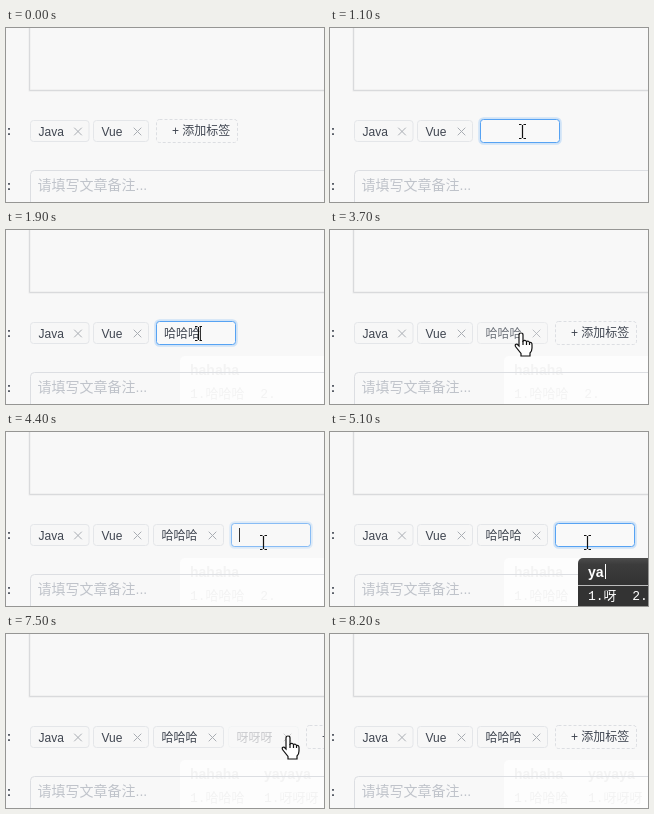
These frames come from a looping animation (318 px wide and 174 px high, 8.6 s). An HTML page with a canvas:

```html
<!DOCTYPE html>
<html lang="zh">
<head>
<meta charset="utf-8">
<style>
  html, body { margin: 0; width: 100%; height: 100%; overflow: hidden; background: #f8f8f8; }
  canvas { display: block; width: 318px; height: 174px; }
</style>
</head>
<body>
<canvas id="stage"></canvas>
<script>
const W = 318, H = 174, LOOP = 8600, STEP = 100;
const SANS = '"Liberation Sans", "Noto Sans CJK SC", "Noto Sans CJK", sans-serif';
const MONO = '"Liberation Mono", "Noto Sans CJK SC", "Noto Sans CJK", monospace';
const INK = '#3f4550', LINE = '#dcdee2', BLUE = '#57a3f3';

const canvas = document.getElementById('stage');
const ctx = canvas.getContext('2d');
const ratio = window.devicePixelRatio || 1;
canvas.width = W * ratio;
canvas.height = H * ratio;

// Each editing session: open the field, type pinyin, commit, confirm with Enter.
const sessions = [
  { x: 150, open: 600, type: 1500, commit: 1900, enter: 3200, pinyin: 'ha', word: '哈' },
  { x: 225, open: 4300, type: 5100, commit: 5500, enter: 6300, pinyin: 'ya', word: '呀' }
];
const REMOVE = 7400, REMOVED = 7600;

// Pointer path: time, x, y
const pointerPath = [
  [100, 254, 88], [200, 226, 97], [300, 205, 102], [400, 192, 103.5],
  [3600, 192, 103.5], [3700, 191, 103], [3800, 212, 106], [3900, 242, 109], [4000, 257, 110.5],
  [6200, 257, 110.5], [6300, 255.5, 110], [6800, 255.5, 110], [6900, 265, 107], [7000, 276, 103], [7100, 282, 102],
  [7600, 282, 102], [7700, 280, 108], [7800, 275, 120], [7900, 268, 140], [8000, 260, 158], [8100, 253, 176]
];

const HAND = new Path2D('M-2 13V2Q-2 0 0 0T2 2V8Q4 6.5 5.5 8.5Q7.5 7.5 8.5 9.5Q11 9 11 11.5V15Q11 18 9 20V23H0V20.5L-5.5 13.5Q-6.5 11 -4 11Z');
const FINGERS = new Path2D('M2 8V12M5.5 9V12M8.5 10V12');
const ARROW = new Path2D('M0 0V16L4 12.5L6.5 18.5L9 17.5L6.5 11.5H11.5Z');
const IBEAM = new Path2D('M-3.5 -7H-1M1 -7H3.5M0 -6.5V6.5M-3.5 7H-1M1 7H3.5');

const clamp = v => Math.max(0, Math.min(1, v));

function text(str, x, y, color = INK, font = '12px ' + SANS) {
  ctx.font = font;
  ctx.fillStyle = color;
  ctx.fillText(str, x, y);
}

function box(x, y, w, h, radius, stroke, fill, lineWidth = 1) {
  ctx.beginPath();
  ctx.roundRect(x, y, w, h, radius);
  if (fill) { ctx.fillStyle = fill; ctx.fill(); }
  if (stroke) { ctx.strokeStyle = stroke; ctx.lineWidth = lineWidth; ctx.stroke(); }
}

function withAlpha(alpha, draw) {
  ctx.save();
  ctx.globalAlpha = alpha;
  draw();
  ctx.restore();
}

function pointerAt(t) {
  const i = pointerPath.findIndex(p => p[0] >= t);
  if (i < 0 || t < pointerPath[0][0]) return null;
  const b = pointerPath[i], a = pointerPath[Math.max(0, i - 1)];
  const k = b[0] === a[0] ? 1 : (t - a[0]) / (b[0] - a[0]);
  return { x: a[1] + (b[1] - a[1]) * k, y: a[2] + (b[2] - a[2]) * k };
}

const inside = (p, x, y, w, h) => p && p.x >= x && p.x <= x + w && p.y >= y && p.y <= y + h;

function drawTag(label, x, w, alpha = 1, closeHover = false) {
  withAlpha(alpha, () => {
    box(x + .5, 92.5, w - 1, 21, 3, '#e4e6e9', '#f7f7f7');
    text(label, x + 8.5, 107.5);
    const cx = x + w - 11.5, r = 3.8;
    ctx.strokeStyle = closeHover ? '#555' : '#a9adb3';
    ctx.lineWidth = 1;
    ctx.beginPath();
    ctx.moveTo(cx - r, 103.5 - r); ctx.lineTo(cx + r, 103.5 + r);
    ctx.moveTo(cx + r, 103.5 - r); ctx.lineTo(cx - r, 103.5 + r);
    ctx.stroke();
  });
}

function drawButton(x, hover) {
  ctx.setLineDash([3, 2]);
  box(x + .5, 91.5, 81, 23, 3, hover ? BLUE : LINE);
  ctx.setLineDash([]);
  text('+ 添加标签', x + 16, 107, hover ? BLUE : INK);
}

function drawInput(s, t) {
  withAlpha(clamp((t - s.open + STEP) / 300), () => {
    box(s.x - .5, 90.5, 81, 25, 4, 'rgba(45,140,240,.2)', null, 2.5);
    box(s.x + .5, 91.5, 79, 23, 3, BLUE, '#f9f9f9');
  });
  const committed = t >= s.commit;
  if (committed) text(s.word.repeat(3), s.x + 8, 107.5);
  const since = t - (committed ? s.commit : s.open);
  const composing = t >= s.type && !committed;
  if (!composing && Math.floor(since / 500) % 2 === 0) {
    ctx.fillStyle = '#333';
    ctx.fillRect(s.x + (committed ? 44 : 8), 96, 1, 14);
  }
}

function candidateText(s, x, n, color) {
  const typed = s.pinyin.repeat(n);
  text('1.' + s.word.repeat(n) + '  2.', x + 10, 167.5, color, '13px ' + MONO);
  text(typed, x + 10, 144.5, color, 'bold 14px ' + SANS);
  return x + 11 + ctx.measureText(typed).width;
}

const candidateX = s => s.x + (s.x === 150 ? 24 : 23);

// Pale remains of a closed candidate window
function drawTrace(s) {
  const x = candidateX(s);
  box(x, 126, W, 60, 5, null, '#fdfdfd');
  candidateText(s, x, 3, '#f3f3f3');
}

function drawCandidates(s, t) {
  const x = candidateX(s);
  const shade = ctx.createLinearGradient(0, 126, 0, 152);
  shade.addColorStop(0, '#4c4c4c');
  shade.addColorStop(.25, '#3c3c3c');
  shade.addColorStop(1, '#333');
  box(x, 126, W, 60, 5, null, shade);
  ctx.fillStyle = '#bbb';
  ctx.fillRect(x, 153, W, 1);
  const caretX = candidateText(s, x, Math.min(3, (t - s.type) / STEP + 1), '#fff');
  ctx.fillRect(Math.round(caretX), 132, 1, 15);
}

function drawPointer(p, kind) {
  ctx.save();
  ctx.strokeStyle = '#111';
  ctx.fillStyle = '#fff';
  ctx.lineWidth = 1.2;
  if (kind === 'text') {
    ctx.translate(Math.floor(p.x) + .5, Math.floor(p.y) + .5);
    ctx.stroke(IBEAM);
  } else {
    ctx.translate(p.x, p.y);
    const shape = kind === 'hand' ? HAND : ARROW;
    ctx.fill(shape);
    ctx.stroke(shape);
    if (kind === 'hand') ctx.stroke(FINGERS);
  }
  ctx.restore();
}

function drawScene(t) {
  ctx.setTransform(ratio, 0, 0, ratio, 0, 0);
  ctx.fillStyle = '#f8f8f8';
  ctx.fillRect(0, 0, W, H);

  const p = pointerAt(t);
  const active = sessions.find(s => t >= s.open && t < s.enter);
  const [first, second] = sessions;
  const hasFirst = t >= first.enter;
  const hasSecond = t >= second.enter && t < REMOVED;
  const slotX = hasSecond ? 300 : hasFirst ? 225 : 150;
  const overSlot = inside(p, slotX, 91, 82, 24);
  const overNotes = inside(p, 24, 142, W, 60);

  // Editor edge and form labels
  box(23.5, -5.5, 320, 68, 0, '#ececec', null, 2);
  box(23.5, -5.5, 320, 68, 0, '#d9dadc');
  text(':', 1, 106.5, INK, 'bold 12px ' + SANS);
  text(':', 1, 162, INK, 'bold 12px ' + SANS);

  sessions.filter(s => t >= s.commit).forEach(drawTrace);
  box(24.5, 142.5, 320, 60, 4, overNotes ? BLUE : LINE);
  text('请填写文章备注...', 31.5, 162, '#bfc3ca', '14px ' + SANS);

  drawTag('Java', 24, 59.5);
  drawTag('Vue', 87, 56);
  const fadeIn = s => clamp((t - s.enter + STEP) / 400);
  const overFirst = hasFirst && inside(p, 147, 92, 71, 22);
  const overSecond = hasSecond && inside(p, 222, 92, 71, 22);
  if (hasFirst) drawTag('哈哈哈', 147, 71, Math.min(fadeIn(first), overFirst ? .75 : 1));
  if (hasSecond) {
    const fadeOut = t < REMOVE ? 1 : .5 - (t - REMOVE) / 400;
    const alpha = Math.min(fadeIn(second), overSecond ? .75 : 1, fadeOut);
    drawTag('呀呀呀', 222, 71, alpha, p && p.x > 275);
  }

  if (active) drawInput(active, t);
  else drawButton(slotX, overSlot);

  if (active && t >= active.type && t < active.commit) drawCandidates(active, t);

  if (p) {
    const overField = active && overSlot && t >= active.open + STEP;
    const kind = overField || overNotes ? 'text'
      : overSlot || overFirst || overSecond ? 'hand' : 'arrow';
    drawPointer(p, kind);
  }
}

const start = performance.now();
function frame() {
  const t = (performance.now() - start) % LOOP;
  drawScene(Math.floor(t / STEP) * STEP);
  requestAnimationFrame(frame);
}
frame();
</script>
</body>
</html>
```
